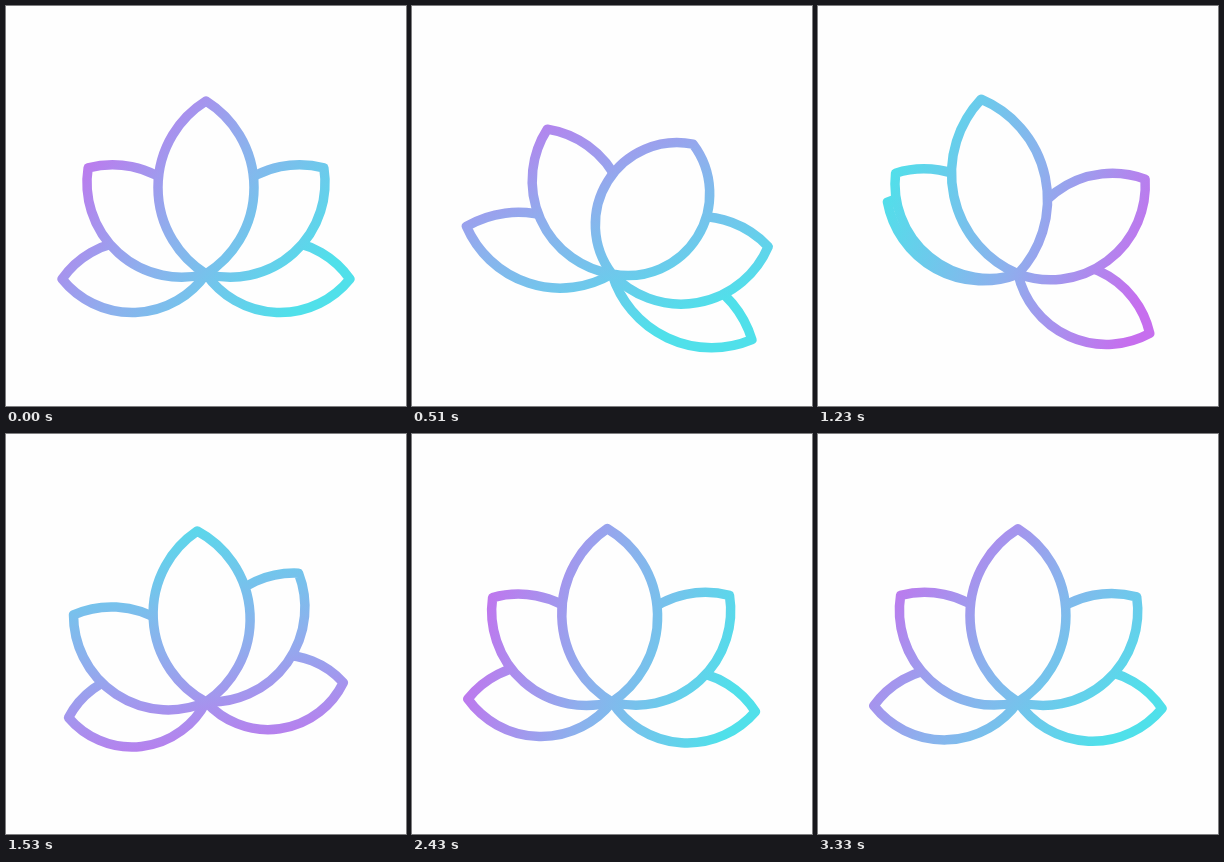
Write an HTML page that moves like this. It is 400x400 px and loops after 5360 ms.

```html
<!DOCTYPE html>
<html lang="en">
<head>
<meta charset="utf-8">
<title>Lotus</title>
<style>
  html, body { margin: 0; width: 100%; height: 100%; overflow: hidden; background: #fefefe; }
  svg { display: block; width: 100%; height: 100%; }
  path { fill: #fefefe; stroke: url(#tint); stroke-width: 9.5; stroke-linejoin: round; }
</style>
</head>
<body>
<svg id="stage" viewBox="0 0 400 400">
  <defs>
    <linearGradient id="tint" gradientUnits="userSpaceOnUse" x1="52" y1="200" x2="334" y2="200">
      <stop offset="0" stop-color="#c66eee"/>
      <stop offset=".5" stop-color="#8cb1ed"/>
      <stop offset="1" stop-color="#50e0ea"/>
    </linearGradient>
  </defs>
</svg>
<script>
const LOOP = 5360, STEP = 30, END = 3330;
const BASE = { x: 200, y: 268 };
const HALF_SWING = 570, DAMPING = .0018;
const LEAD = 165; // the stretch springs back this much before the sway

const lower = { len: 144, half: 36, thin: .16, stretch: 15 };
const side = { len: 158.6, half: 43, thin: 0, stretch: 0 };
const middle = { len: 173, half: 48, thin: .24, stretch: -20 };

// Back to front. Each petal leans by sway degrees, then is let go.
const petals = [
  { ...lower, rest: -92, sway: 33, rise: 890, release: 1200 },
  { ...lower, rest: 92, sway: 33, rise: 800, release: 1120 },
  { ...side, rest: -48, sway: 27, rise: 645, release: 915 },
  { ...side, rest: 48, sway: 33, rise: 567, release: 990 },
  { ...middle, rest: 0, sway: 32, rise: 520, release: 745 }
];

const stage = document.getElementById("stage");
const tint = document.getElementById("tint");
for (const p of petals) {
  p.el = document.createElementNS("http://www.w3.org/2000/svg", "path");
  stage.append(p.el);
}

// Ease up to 1, hold, then swing back to 0 as a damped spring.
function swing(t, rise, release) {
  const u = Math.min(1, t / rise);
  const free = Math.max(0, t - release);
  return u * u * (3 - 2 * u) *
    Math.exp(-DAMPING * free) * Math.cos(Math.PI * free / HALF_SWING);
}

// Ease in and out, with the fastest part before the middle.
function easeTurn(u) {
  const a = u ** 1.9, b = .45 * (1 - u) ** 1.9;
  return a / (a + b);
}

function lens(angle, len, half) {
  const a = angle * Math.PI / 180;
  const x = BASE.x + len * Math.sin(a), y = BASE.y - len * Math.cos(a);
  const r = (len * len / 4 + half * half) / (2 * half);
  const arc = (px, py) => `A${r} ${r} 0 0 1 ${px} ${py}`;
  return `M${BASE.x} ${BASE.y}${arc(x, y)}${arc(BASE.x, BASE.y)}Z`;
}

function draw(t) {
  for (const p of petals) {
    const angle = p.rest + p.sway * swing(t, p.rise, p.release);
    const extra = p.stretch * swing(t, p.rise, p.release - LEAD);
    p.el.setAttribute("d", lens(angle, p.len + extra, p.half - p.thin * extra));
  }
  const turn = 39 + 360 * easeTurn(t / END);
  tint.setAttribute("gradientTransform", `rotate(${turn} 200 200)`);
}

const start = performance.now();
function tick() {
  const t = (performance.now() - start) % LOOP;
  draw(Math.min(END, Math.floor(t / STEP) * STEP));
  requestAnimationFrame(tick);
}
tick();
</script>
</body>
</html>
```
